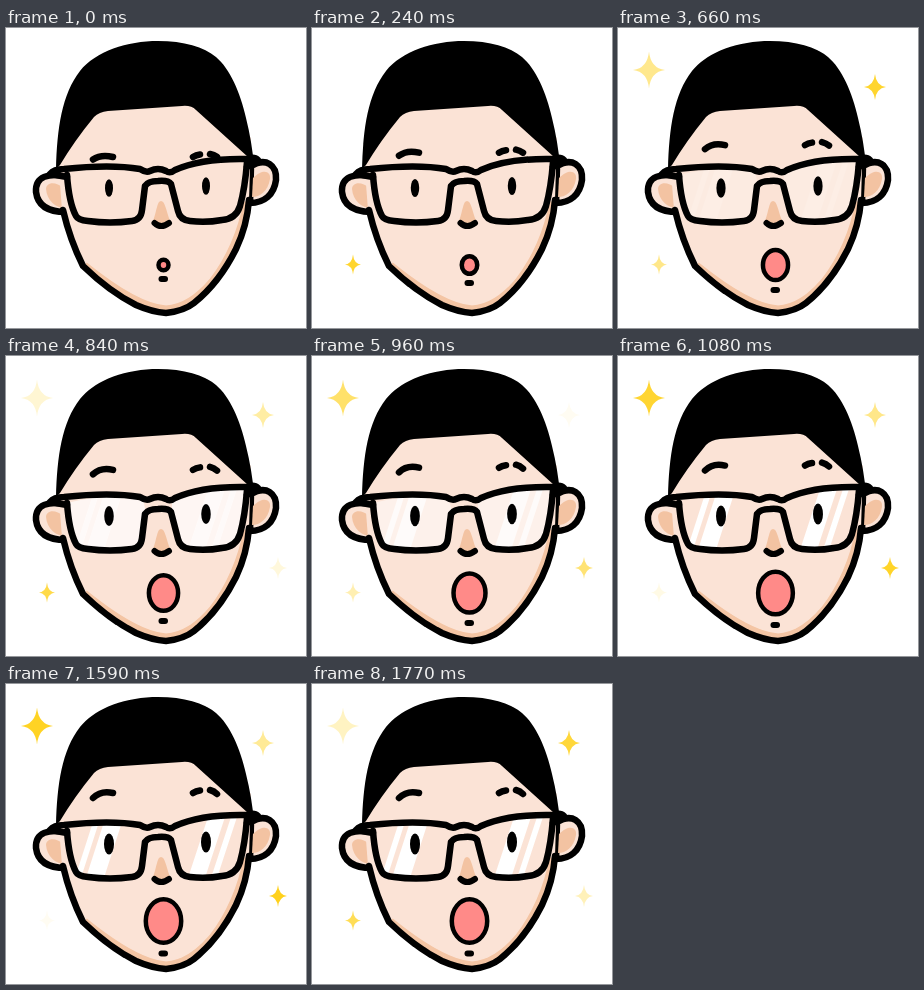
These frames come from a looping animation (300x300 px, 1800 ms). An HTML page:

```html
<!DOCTYPE html>
<html lang="en">
<head>
<meta charset="utf-8">
<title>Surprised face</title>
<style>
html, body { margin: 0; width: 100%; height: 100%; overflow: hidden; background: #fff; }
svg { display: block; width: 100vw; height: 100vh; }
.ink { fill: none; stroke: #000; stroke-linecap: round; stroke-linejoin: round; }
.skin { fill: #fbe3d6; }
.blush { fill: #f3c3a2; }
</style>
</head>
<body>
<svg viewBox="0 0 300 300">
  <defs>
    <path id="leftLens" d="M61 147 Q63 175 70 188 Q72 192 82 193 Q104 196 126 193 Q135 192 136 182 L140 157 L137 143 Q100 137 61 147Z"/>
    <path id="rightLens" d="M166 157 L172 183 Q174 192 184 193 Q200 195 216 192 Q230 191 234 178 Q239 160 241 134 Q195 129 166 146Z"/>
    <clipPath id="lensClip"><use href="#leftLens"/><use href="#rightLens"/></clipPath>
    <path id="face" d="M52 130 L56 182 Q64 212 77 238 Q104 264 130 277 Q146 284 160 285 Q178 283 188 275 Q213 255 230 221 Q241 198 243 172 L245 110 L200 60 H85Z"/>
    <clipPath id="faceClip"><use href="#face"/></clipPath>
  </defs>

  <g class="ink" stroke-width="6.5">
    <path class="skin" d="M60 148 C43 145 29 148 30 164 C32 180 46 184 60 184Z"/>
    <path class="skin" d="M245 138 C260 129 271 137 270 152 C268 167 258 175 244 175Z"/>
  </g>
  <path class="blush" d="M58 160 C48 152 40 155 40 161 C41 173 50 180 59 180Z"/>
  <path class="blush" d="M247 150 C257 140 265 143 264 151 C262 163 254 169 246 169Z"/>

  <use href="#face" class="skin"/>
  <g clip-path="url(#faceClip)">
    <path fill="none" stroke="#f4c5a4" stroke-width="9" d="M78 238 Q130 280 160 282 Q184 281 207 254 Q233 220 242 174"/>
  </g>
  <path class="ink" stroke-width="6.5" d="M57 182 Q64 212 77 238 Q104 264 130 277 Q146 284 160 285 Q178 283 188 275 Q213 255 230 221 Q241 198 243 172"/>
  <path d="M50 141 C51 100 56 66 74 43 C90 23 121 13 152 13 C178 13 198 19 210 29 C224 41 234 64 240 90 Q246 114 248 138 L242 129 L190 82 Q185 77 176 78 L102 83 Q93 84 88 89 Q69 112 54 137Z"/>

  <path class="blush" d="M155 173 C151 173 151 182 147 193 Q155 200 164 193 C160 182 159 173 155 173Z"/>
  <path class="ink" stroke-width="6" d="M148.500 195 Q155 201 163 195"/>

  <g class="ink" stroke-width="6.500">
    <path id="leftBrow"/>
    <path id="rightBrow"/>
  </g>

  <g clip-path="url(#lensClip)">
    <rect id="flash" x="55" y="125" width="195" height="75" fill="#fff"/>
    <path id="glare" fill="#fff" d="M87 138 h6 l-20 62 h-6Z M98 138 h18 l-20 62 h-18Z M203 130 h17 l-23 70 h-17Z M226 130 h6 l-23 70 h-6Z"/>
  </g>
  <ellipse class="eye" cx="103" cy="160"/>
  <ellipse class="eye" cx="200" cy="158"/>
  <g class="ink" stroke-width="6.5">
    <path d="M61 149 L44 146 Q48 141 58 141 Q105 136 134 141 Q140 145 144 143 Q152 139 160 143 Q164 146 169 142 Q195 130 241 131 Q248 128 252 132 L241 139"/>
    <path d="M61 147 Q63 175 70 188 Q72 192 82 193 Q104 196 126 193 Q135 192 136 182 L139 158 Q142 153 152 153 Q162 152 165 156 L172 183 Q174 192 184 193 Q200 195 216 192 Q230 191 234 178 Q239 160 241 134"/>
  </g>

  <ellipse id="mouth" cx="157.5" cy="237" fill="#ff8a88" stroke="#000" stroke-width="4.5"/>
  <path id="chin" class="ink" stroke-width="6" d="M155.5 0 H159"/>
  <g id="stars" fill="#ffd11a"></g>
</svg>
<script>
const LOOP = 1800, STEP = 30, TWINKLE = 525;
const el = id => document.getElementById(id);
const mix = (a, b, p) => a + (b - a) * p;
const ramp = (t, from, to) => Math.min(1, Math.max(0, (t - from) / (to - from)));

function set(node, attrs) {
  for (const name in attrs) node.setAttribute(name, attrs[name]);
}

// Opacity rises and falls evenly once the star has started.
function twinkle(t, start) {
  if (t < start) return 0;
  const phase = (t - start) / TWINKLE % 1;
  return 1 - Math.abs(2 * phase - 1);
}

function addStar(x, y, w, h, start) {
  const node = document.createElementNS("http://www.w3.org/2000/svg", "path");
  const a = w * .1, b = h * .1;
  set(node, {
    transform: `translate(${x} ${y})`,
    d: `M0 ${-h} Q${a} ${-b} ${w} 0 Q${a} ${b} 0 ${h} Q${-a} ${b} ${-w} 0 Q${-a} ${-b} 0 ${-h}Z`
  });
  el("stars").append(node);
  return { node, start };
}

const stars = [
  addStar(31, 42, 16, 18.5, 265),
  addStar(257, 59, 11, 13, 420),
  addStar(41, 236.5, 8, 10, 0),
  addStar(272, 212, 9, 11, 800)
];
const eyes = document.querySelectorAll(".eye");

function draw(t) {
  const p = ramp(t, 0, 1110);

  set(el("mouth"), { rx: mix(5, 17.7, p), ry: mix(5.2, 21.8, p) });
  set(el("chin"), { transform: `translate(0 ${mix(251, 269.5, p)})` });
  for (const eye of eyes) set(eye, { rx: mix(4, 5, p), ry: mix(8.7, 10.5, p) });

  const lift = `translate(0 ${mix(20, 0, p)})`, flat = mix(2.5, 0, p);
  set(el("leftBrow"), { transform: lift, d: `M87 ${114 - flat} Q95 106 107 109` });
  set(el("rightBrow"), { transform: lift, d: `M187 109 Q190 107 194 106.5 M204 106 Q208 107 211 ${110 - flat / 2}` });

  set(el("flash"), { opacity: .7 * Math.sin(Math.PI * ramp(t, 600, 1080)) });
  set(el("glare"), { opacity: ramp(t, 600, 1080) });
  for (const { node, start } of stars) set(node, { opacity: twinkle(t, start) });
}

function tick() {
  const t = performance.now() % LOOP;
  draw(Math.floor(t / STEP) * STEP);
  requestAnimationFrame(tick);
}
tick();
</script>
</body>
</html>
```
